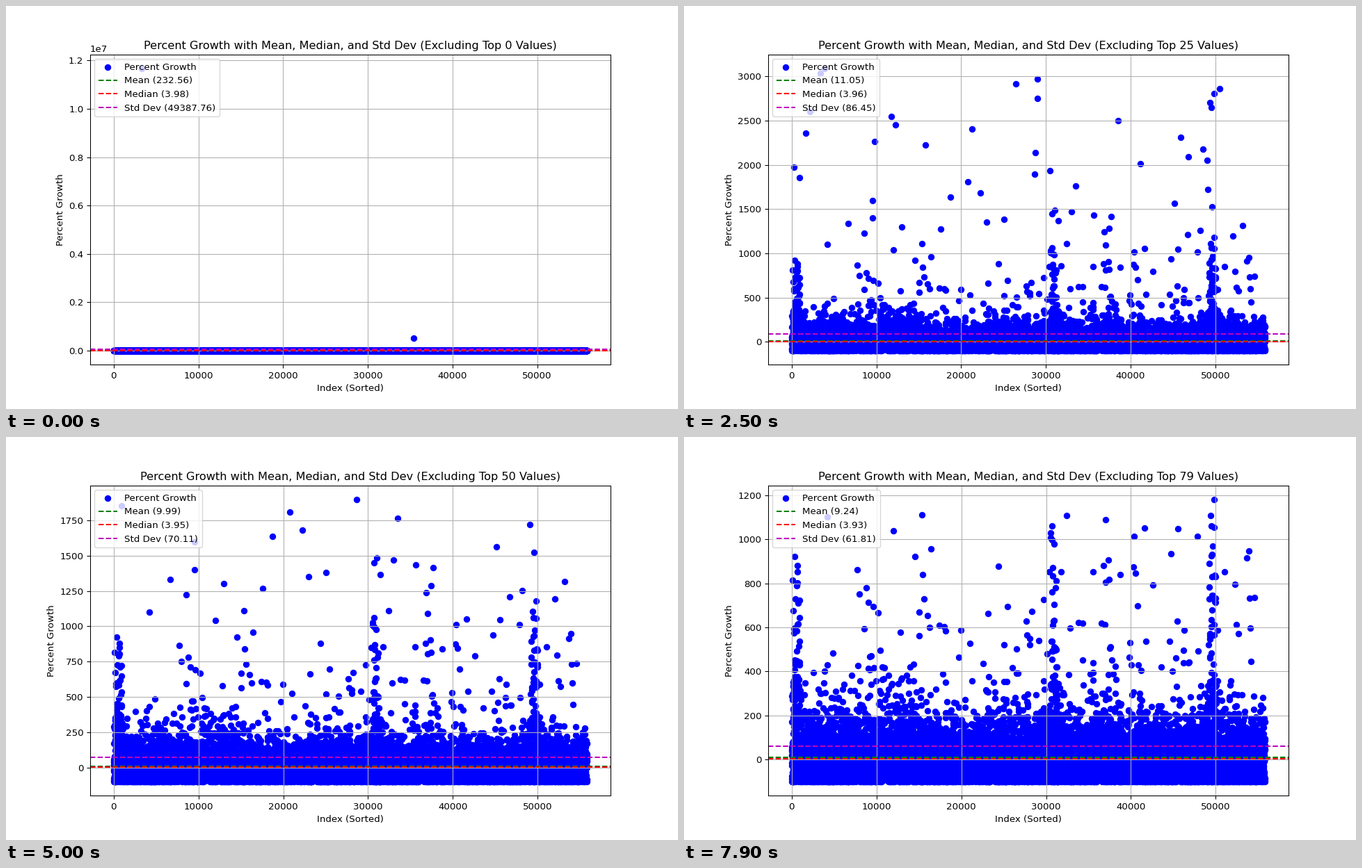
Write a matplotlib script that moves like this. It is 966 by 580 pixels and loops after 8000 ms.

```python
import numpy as np
import matplotlib.pyplot as plt
from matplotlib.animation import FuncAnimation

FRAMES, INTERVAL = 80, 100
DPI = 96.6
SIZE = (966.001 / DPI, 580.001 / DPI)  # tiny margin keeps truncation at 966 x 580
N = 55900
CLUSTERS = [(50, 1050, 925), (30350, 1150, 1100), (48950, 1400, 1080)]
rng = np.random.default_rng(7)

# Key points: removed count, largest value left, statistics
KEYS = [0, 12, 25, 33, 50, 60, 79]
PEAKS = [11.669e6, 5210, 3089, 2650, 1898, 1486, 1181]
MEANS = [232.56, 11.93, 11.05, 10.64, 9.99, 9.69, 9.24]
MEDIANS = [3.98, 3.97, 3.96, 3.96, 3.95, 3.95, 3.93]
STDS = np.array([49387.76, 104.27, 86.45, 79.42, 70.11, 66.49, 61.81])


def giants():
    """The few extreme values that dominate the first second."""
    x = np.r_[3343, 35456, rng.uniform(2000, 54000, 10)]
    y = np.r_[PEAKS[0], 503e3, np.geomspace(40000, 6000, 10)]
    return np.c_[x, y]


def outliers():
    """Descending values, about a third of them inside the clusters."""
    rank = np.arange(KEYS[1], FRAMES)
    y = np.exp(np.interp(rank, KEYS, np.log(PEAKS)))
    x = rng.uniform(1500, 55000, rank.size)
    for i in np.flatnonzero(rng.random(rank.size) < 0.3):
        start, width, _ = CLUSTERS[rng.integers(3)]
        x[i] = start + width * rng.random()
    return np.c_[x, y]


def body(n=9000):
    x = np.linspace(0, N - 1, n)
    floor = np.where(abs(x - 11100) < 250, -84, -100)
    return np.c_[x, np.maximum(floor, rng.uniform(-112, 95, n))]


def tail(n=2600):
    x = rng.uniform(0, N - 1, n)
    scale = np.interp(x, [0, 14000, 17000, 32000, 38000, 45000, 49500, N],
                      [72, 78, 52, 78, 74, 58, 76, 60])
    y = 58 + scale * rng.exponential(1, n)
    return np.c_[x, np.where(y > 550, 120, y)]


def scattered(n=110):
    return np.c_[rng.uniform(1200, 55000, n),
                 380 * (1140 / 380) ** rng.random(n) ** 1.15]


def cluster(start, width, top, n=30):
    x = start + width * rng.beta(2, 2, n)
    y = 330 * (top / 330) ** rng.random(n) ** 1.2
    low = np.c_[start + width * rng.random(2 * n), rng.uniform(90, 370, 2 * n)]
    return np.vstack([np.c_[x, y], low])


top = np.vstack([giants(), outliers()])
rest = np.vstack([body(), tail(), scattered()] + [cluster(*c) for c in CLUSTERS])

# Statistics fall in step with the sums of the removed values
sum1 = np.r_[0, np.cumsum(top[:, 1])]
sum2 = np.r_[0, np.cumsum(top[:, 1] ** 2)]


def stats(k):
    mean = np.interp(sum1[k], sum1[KEYS], MEANS)
    median = np.interp(k, KEYS, MEDIANS)
    std = np.sqrt(np.interp(sum2[k], sum2[KEYS], STDS ** 2))
    return mean, median, std


fig, ax = plt.subplots(figsize=SIZE, dpi=DPI)


def draw(k):
    ax.clear()
    x, y = np.vstack([rest, top[k:]]).T
    x = x - np.searchsorted(np.sort(top[:k, 0]), x)  # reindex after removal
    ax.scatter(x, y, color="blue", label="Percent Growth")
    for name, color, value in zip(("Mean", "Median", "Std Dev"), "grm", stats(k)):
        ax.axhline(value, color=color, linestyle="--", label=f"{name} ({value:.2f})")
    ax.set_title("Percent Growth with Mean, Median, and Std Dev "
                 f"(Excluding Top {k} Values)")
    ax.set_xlabel("Index (Sorted)")
    ax.set_ylabel("Percent Growth")
    ax.legend(loc="upper left")
    ax.grid(True)


anim = FuncAnimation(fig, draw, frames=FRAMES, interval=INTERVAL, repeat=True)
plt.show()
```
